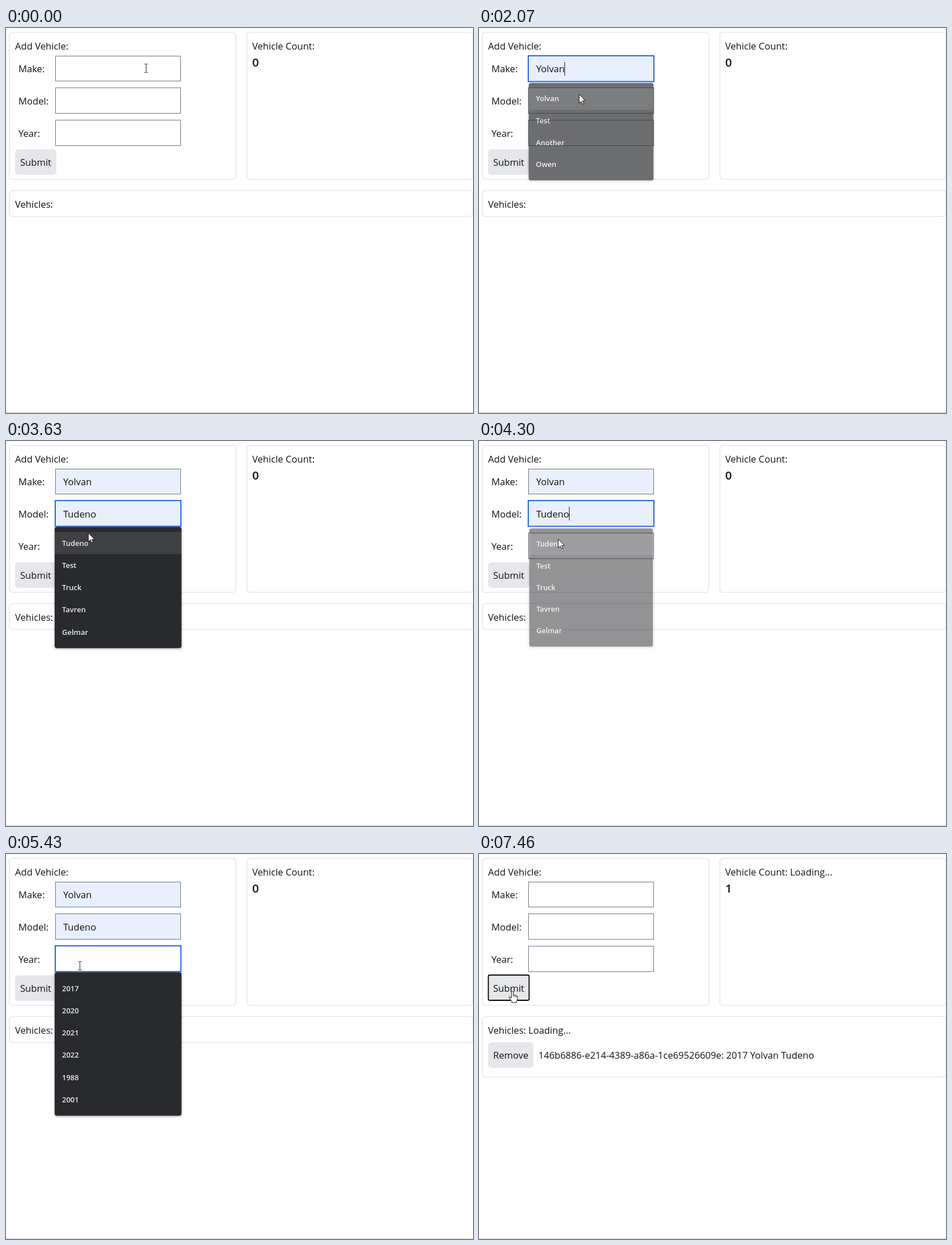
Recreate the animation shown at these times as an HTML page. Size 825 by 679 pixels, loop 8000 ms.

```html
<!DOCTYPE html>
<html lang="en">
<head>
<meta charset="utf-8">
<title>Add vehicle</title>
<style>
  html, body { margin: 0; height: 100%; overflow: hidden; background: #fff; }
  svg { display: block; width: 825px; height: 679px; font: 16.6px "Open Sans", "Noto Sans", sans-serif; fill: #111; }
  .panel { fill: none; stroke: #e5e7eb; stroke-width: 1.7; }
  .button { fill: #e5e7eb; }
  .popup { font-size: 13px; font-weight: 600; fill: #e8eaed; }
  .popup .sheet { fill: #292a2d; filter: drop-shadow(0 1px 2px rgba(0, 0, 0, .4)); }
  .count { font-size: 20.5px; font-weight: 600; }
  .cursor { fill: #fff; stroke: #111; stroke-linejoin: round; }
</style>
</head>
<body>
<svg id="stage" viewBox="0 0 825 679"></svg>
<script>
const LOOP = 8000, CLEARED = 7390, ADDED = 7460;
const stage = document.getElementById('stage');

// alpha: [time, opacity] steps of the suggestion popup
const fields = [
  { label: 'Make:', y: 49.5, height: 44, focus: [910, 2790], filled: 1390,
    caret: [[910, 1390], [1840, 2530]],
    options: ['Yolvan', 'Test', 'Another', 'Owen'],
    alpha: [[910, 1], [1980, .93], [2070, .68], [2170, .32], [2250, 0]] },
  { label: 'Model:', y: 105.5, height: 45, focus: [2790, 4910], filled: 3576,
    caret: [[2790, 3340], [3970, 4580]],
    options: ['Tudeno', 'Test', 'Truck', 'Tavren', 'Gelmar'],
    alpha: [[2930, .5], [3020, 1], [4220, .8], [4300, .5], [4370, .2], [4440, 0]] },
  { label: 'Year:', y: 162.5, height: 45, focus: [4910, 7150], filled: 5582,
    caret: [[4910, 5430], [6070, 6620]],
    options: ['2017', '2020', '2021', '2022', '1988', '2001'],
    alpha: [[5020, .5], [5120, 1], [6300, .85], [6380, .5], [6450, .17], [6540, 0]] }
];

// start, end, number of steps, target x, target y
const moves = [
  [1240, 1615, 6, 177, 117],
  [2530, 2630, 2, 162, 130],
  [3340, 3890, 8, 140, 173],
  [4580, 4730, 3, 131, 183],
  [5430, 5810, 6, 128, 229],
  [6620, 7000, 6, 59, 242]
];
const clicks = [[770, 910], [1690, 1980], [2790, 2930], [3890, 4220], [4910, 5020], [5980, 6300], [7150, 7390]];

const shapes = {
  beam: '<path d="M-2.5-7.5h2.3l.7.7.7-.7H3.5M-2.5 7.5h2.3l.7-.7.7.7H3.5M.5-7V7" fill="none" stroke="#222"/>',
  arrow: '<path class="cursor" d="M0 0V15.6L3.6 12.2 6 17.3 8.4 16.2 6.1 11.3H11Z"/>',
  hand: '<path class="cursor" d="M-1.7 1Q0-1.5 1.7 1V7Q3.3 5.4 4.4 7.4 6 6.2 6.9 8.3 8.8 7.6 9 10V14Q8.8 16 7.4 17.4V20H-1V18Q-3 15.5-5.5 12-6.6 9.8-4.7 9.5L-1.7 12Z"/><path d="M1.7 7v3.5M4.4 7.5v3M6.9 8.5v2.5" stroke="#111" stroke-width=".8"/>'
};

const ruler = document.createElement('canvas').getContext('2d');
ruler.font = '16.6px "Open Sans", "Noto Sans", sans-serif';

const within = (t, [from, to]) => t >= from && t < to;
const text = (x, y, content, cls = '') => `<text x="${x}" y="${y}" class="${cls}">${content}</text>`;
const rect = (x, y, w, h, attrs) => `<rect x="${x}" y="${y}" width="${w}" height="${h}" ${attrs}/>`;
const popupAlpha = (field, t) => field.alpha.reduce((a, [time, value]) => t >= time ? value : a, 0);
const popupTop = field => field.y + 46;

function pointer(t) {
  let x = 247, y = 71;
  for (const [start, end, steps, toX, toY] of moves) {
    if (t < start) break;
    const step = Math.min(steps, Math.floor((t - start) / (end - start) * (steps - 1) + 1e-6) + 1);
    const eased = 1 - (1 - step / steps) ** 2;
    x += (toX - x) * eased;
    y += (toY - y) * eased;
  }
  return { x, y };
}

function drawField(field, t) {
  const { y, height } = field;
  const middle = y + height / 2;
  const filled = within(t, [field.filled, CLEARED]);
  const fill = `fill="${filled ? '#e8f0fe' : '#fff'}"`;
  const value = filled ? field.options[0] : '';
  let out = text(22, middle + 6.8, field.label);
  out += within(t, field.focus)
    ? rect(87, y - .5, 222, 45.5, `${fill} stroke="#2563eb" stroke-width="2"`)
    : rect(87.5, y, 221, height, `${fill} stroke="#6b7280"`);
  out += text(101, middle + 6.8, value);
  if (field.caret.some(span => within(t, span))) {
    out += rect(101 + Math.round(ruler.measureText(value).width), y + 10.5, 1, 24, '');
  }
  return out;
}

function drawPopup(field, t) {
  const alpha = popupAlpha(field, t);
  if (!alpha) return '';
  const pitch = 39.25, pad = 8.75, top = popupTop(field);
  const height = field.options.length * pitch + 2 * pad;
  const middle = top + height / 2;
  const hover = t >= field.filled ? rect(86, top + pad, 224, pitch, 'fill="#3f4043"') : '';
  const rows = field.options.map((option, i) => text(99, top + pad + (i + .5) * pitch + 4.7, option));
  return `<g class="popup" opacity="${alpha}" transform="translate(198 ${middle}) scale(${.95 + .05 * alpha}) translate(-198 ${-middle})">`
    + rect(86, top, 224, height, 'rx="4" class="sheet"') + hover + rows.join('') + '</g>';
}

function drawPointer(t) {
  const { x, y } = pointer(t);
  const overPopup = fields.some(f => popupAlpha(f, t) && y > popupTop(f));
  const overField = fields.some(f => y > f.y && y < f.y + f.height);
  const shape = x < 88 && y > 213 ? 'hand' : overField && !overPopup ? 'beam' : 'arrow';
  let out = `<g transform="translate(${x} ${y})">${shapes[shape]}</g>`;
  if (clicks.some(span => within(t, span))) {
    out += `<circle cx="${x - 2}" cy="${y - 1}" r="13" fill="#fff200" opacity=".52"/>`;
  }
  return out;
}

function draw(t) {
  const loading = t >= CLEARED ? ' Loading...' : '';
  const added = t >= ADDED;
  const submit = t >= 7150
    ? rect(16.5, 213.5, 72, 44.5, 'rx="2.5" class="button" stroke="#000" stroke-width="1.8"')
    : rect(16, 214, 73, 45, 'rx="6" class="button"');
  let out = rect(6, 7.5, 400, 259.5, 'rx="6" class="panel"')
    + rect(425.5, 7.5, 399.5, 259.5, 'rx="6" class="panel"')
    + rect(6, 286.5, 819, added ? 107 : 46, 'rx="6" class="panel"')
    + rect(0, 678, 825, 1, 'fill="#c8c8c8"')
    + text(16, 37.5, 'Add Vehicle:')
    + text(435, 37.5, 'Vehicle Count:' + loading)
    + text(435, 67.5, added ? 1 : 0, 'count')
    + text(16, 317, 'Vehicles:' + loading)
    + submit + text(25, 242.5, 'Submit');
  if (added) {
    out += rect(16, 332, 80, 45, 'rx="6" class="button"') + text(25, 360.5, 'Remove')
      + text(105, 360.5, `146b6886-e214-4389-a86a-1ce69526609e: 2017 ${fields[0].options[0]} ${fields[1].options[0]}`);
  }
  for (const field of fields) out += drawField(field, t);
  for (const field of fields) out += drawPopup(field, t);
  stage.innerHTML = out + drawPointer(t);
}

const begin = performance.now();
function tick() {
  draw((performance.now() - begin) % LOOP);
  requestAnimationFrame(tick);
}
tick();
</script>
</body>
</html>
```
